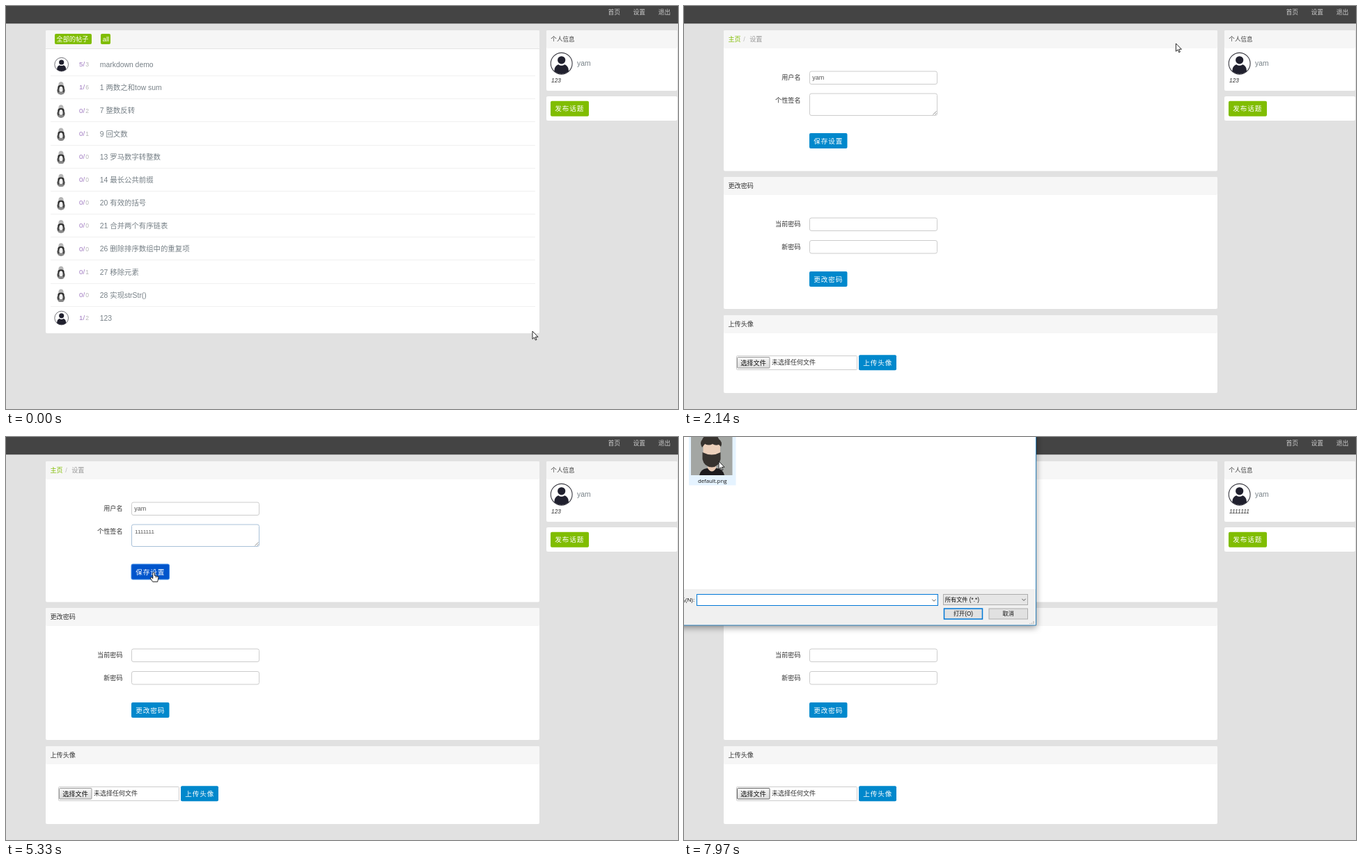
Animation, 965 px wide and 580 px high, one loop 8 s. Source, as an HTML page:

```html
<!DOCTYPE html>
<html lang="zh-CN">
<head>
<meta charset="utf-8">
<title>Settings demo</title>
<style>
html, body { margin: 0; width: 100%; height: 100%; overflow: hidden; background: #e1e1e1; }
svg { display: block; width: 965px; height: 580px; }
text { font-family: "Liberation Sans", "Noto Sans CJK SC", "Noto Sans CJK", sans-serif; white-space: pre; }
.hum { font-family: "Open Sans", "Noto Sans", "Noto Sans CJK SC", sans-serif; }
.btn { letter-spacing: .9px; }
#dialog { filter: drop-shadow(0 3px 5px rgba(0,0,0,.4)); }
#popup rect.card { filter: drop-shadow(0 1px 3px rgba(0,0,0,.3)); }
</style>
</head>
<body>
<svg id="stage" viewBox="0 0 965 580" xmlns="http://www.w3.org/2000/svg"></svg>
<script>
const LOOP = 8000;
const GREEN = '#80bd01', BLUE = '#0088cc', USER = 'yam';

const rect = (x, y, w, h, fill, extra = '') =>
  `<rect x="${x}" y="${y}" width="${w}" height="${h}" fill="${fill}" ${extra}/>`;
const text = (x, y, str, size = 9.1, fill = '#333', extra = '') =>
  `<text x="${x}" y="${y}" font-size="${size}" fill="${fill}" ${extra}>${str}</text>`;
const path = (d, fill, extra = '') => `<path d="${d}" fill="${fill}" ${extra}/>`;
const group = (id, body, extra = '') => `<g id="${id}" ${extra}>${body}</g>`;
const END = 'text-anchor="end"', MID = 'text-anchor="middle"';

const panel = (x, y, w, h) =>
  rect(x, y, w, h, '#fff', 'rx="2"') + rect(x, y, w, 26, '#f6f6f6', 'rx="2"');
const button = (x, y, w, label, fill, id = '') =>
  rect(x, y, w, 22, fill, `rx="2" ${id && `id="${id}"`}`) +
  text(x + 6.2, y + 14.6, label, 9.6, '#fff', 'class="btn"');
const field = (y, h, id = '') =>
  rect(180.5, y, 183, h, '#fff', `rx="2.5" stroke="#ccc" ${id && `id="${id}"`}`);
const chevron = (x, y) =>
  path(`M${x - 2.6} ${y - 1.3}l2.6 2.6 2.6-2.6`, 'none', 'stroke="#444" stroke-width=".9"');

// Round user icon, drawn for radius 15.5
const userIcon = (x, y, k = 1) => `<g transform="translate(${x} ${y}) scale(${k})">
  <circle r="15.4" fill="#fff" stroke="#3a3a42" stroke-width="1.1"/>
  <circle cy="-5" r="5.6" fill="#20202e"/>
  <path d="M-10.3 11.5C-10.3 5.500-8 2.800-4.500 1.500Q0 4.500 4.500 1.500C8 2.800 10.300 5.500 10.300 11.500Q0 18.800-10.300 11.500Z" fill="#20202e"/></g>`;

const catIcon = (x, y) => `<g transform="translate(${x} ${y})">
  <ellipse cy="3.500" rx="5.600" ry="6" fill="#4c4c4c"/>
  <ellipse cy="-4.500" rx="3.600" ry="4.500" fill="#b5b5b5"/>
  <ellipse cy="-1" rx="4.600" ry="3.200" fill="#2f2f2f"/>
  <ellipse cy="2" rx="2.600" ry="4.200" fill="#efefef"/>
  <ellipse cy="7.300" rx="4.300" ry="2" fill="#888"/></g>`;

const topics = [
  ['5/3', 'markdown demo'], ['1/6', '1 两数之和tow sum'], ['0/2', '7 整数反转'],
  ['0/1', '9 回文数'], ['0/0', '13 罗马数字转整数'], ['0/0', '14 最长公共前缀'],
  ['0/0', '20 有效的括号'], ['0/0', '21 合并两个有序链表'], ['0/0', '26 删除排序数组中的重复项'],
  ['0/1', '27 移除元素'], ['0/0', '28 实现strStr()'], ['1/2', '123']
];

function topicRow([count, title], i) {
  const y = 84 + 33.17 * i, last = i === topics.length - 1;
  const [replies, views] = count.split('/');
  return (i === 0 || last ? userIcon(79.7, y + .2, .64) : catIcon(79, y + .9)) +
    text(105, y + 3.3, replies + '/', 9.8, '#9e78c0') +
    text(114.2, y + 3.3, views, 8.6, '#b4b4b4') +
    text(134.8, y + 4, title, 10.4, '#778087') +
    (last ? '' : rect(64, Math.round(y + 16), 696, 1, '#f0f0f0'));
}

const listPage = panel(57, 35, 709, 436) + rect(57, 61, 709, 1, '#e5e5e5') +
  rect(70, 40, 53, 15, GREEN, 'rx="2"') + text(72.5, 51, '全部的帖子', 9.2, '#fff') +
  rect(136, 40, 14, 15, GREEN, 'rx="2"') + text(138.7, 51, 'all', 9.4, '#fff') +
  topics.map(topicRow).join('');

const label = (y, str) => text(167.5, y, str, 9.1, '#333', END);

const settingsPage = panel(57, 35, 709, 202.5) + panel(57, 246, 709, 190) + panel(57, 445, 709, 112) +
  text(63.5, 51.2, '主页', 9.1, GREEN) + text(85.2, 51.2, '/', 9.1, '#bbb') + text(94.2, 51.2, '设置', 9.1, '#999') +
  text(63.5, 262.2, '更改密码') + text(63.5, 461.2, '上传头像') +
  label(106.2, '用户名') + label(138.7, '个性签名') + label(317.4, '当前密码') + label(349.8, '新密码') +
  field(94, 18.5) + field(126, 31.5, 'area') + field(305, 18.5) + field(337.5, 18.5) +
  text(184.3, 106, USER, 9, '#555') + text(185, 138.6, '', 8.1, '#555', 'id="typed"') +
  rect(184.5, 130.500, .8, 10, '#333', 'id="caret"') +
  path('M357.5 156.500l5-5M360.500 156.500l2-2', 'none', 'stroke="#777" stroke-width=".8"') +
  button(180, 183, 54.5, '保存设置', BLUE, 'save') + button(180, 382, 54.5, '更改密码', BLUE) +
  rect(75.5, 503.5, 173, 20, '#fff', 'rx="1" stroke="#ccc"') +
  rect(76.5, 505.5, 46.500, 15.500, 'url(#grey)', 'id="pick" rx="1" stroke="#999"') +
  text(81.2, 516.7, '选择文件', 9.2, '#111') + text(126, 515.6, '未选择任何文件', 9, '#333') +
  button(251, 502.3, 54, '上传头像', BLUE);

const sidebar = panel(776, 35, 188, 87) + rect(776, 130, 188, 35, '#fff', 'rx="2"') +
  text(782.3, 51.2, '个人信息', 8.6, '#444') + userIcon(797.700, 82.800) +
  text(820, 86.3, USER, 10.4, '#778087') +
  text(783, 110.2, '123', 8.4, '#333', 'id="sign" font-style="italic"') +
  button(782, 136.7, 55, '发布话题', GREEN);

const starPoints = Array.from({ length: 10 }, (_, i) => {
  const r = i % 2 ? 2.2 : 5.2, a = Math.PI * (i / 5 - .5);
  return `${283.5 + r * Math.cos(a)},${220.800 + r * Math.sin(a)}`;
}).join(' ');

const popup = rect(222, 202, 162.5, 117.5, '#fff', 'class="card"') + rect(222, 202, 162.5, 1.6, '#cc1a1a') +
  text(230.3, 224.7, '保存设置', 10.4, '#000', 'font-weight="bold"') +
  `<polygon points="${starPoints}" fill="none" stroke="#888" stroke-width=".8"/>` +
  text(376, 223.3, '更多释义»', 8.5, '#999', END) +
  text(230.3, 239.6, 'save settings', 9.3, '#333', 'class="hum"') +
  text(230.3, 263.4, '网络释义', 9.1, '#999') + rect(268, 259.5, 108, 1, '#eee') +
  text(230.3, 277, 'Storage Media ; Se&amp;exit step ; SETS', 8.9, '#333', 'class="hum"') +
  text(230.3, 296.700, '相关查询', 9.1, '#999') + rect(230, 292, 146, 1, '#e6e6e6') +
  text(230.3, 308.2, '设置', 9, '#1a78c2');

const portrait = rect(10, -6, 59.5, 61, '#a3a6a3') +
  path('M22 55Q24 46 33 45H47Q56 46 58 55Z', '#1d1b1d') +
  path('M34 38H46V45Q40 54 34 45Z', '#e6c8b2') +
  path('M27.500 8H52V27Q50 41 40 42Q29 41 27.500 27Z', '#ecd0bb') +
  path('M26.500 22Q40 29 52.500 22V32Q50 43 40 43.500Q29 43 26.500 32Z', '#37332f') +
  path('M26 15Q22 8 26 4Q28-3 37-2Q48-4 50 3Q56 7 53 14L50 11Q45 13 41 10Q36 13 30 10Z', '#37332f');

const dialogButton = (x, w, str, edge, weight) =>
  rect(x, 247, w, 15, '#e1e1e1', `stroke="${edge}" stroke-width="${weight}"`) +
  text(x + w / 2, 257.3, str, 8.2, '#111', MID);

const dialog = rect(-20, -20, 525.5, 291, '#fff') + rect(-20, 219, 525.5, 52, '#f0f0f0') +
  path('M505.500-20V271H-20', 'none', 'stroke="#2c7fb8" stroke-width="1"') +
  rect(7, -5, 67.5, 74.5, '#e5f3ff', 'id="hover"') + portrait +
  text(40.7, 65.5, 'default.png', 7.8, '#111', 'class="hum" ' + MID) +
  text(15.3, 237.2, '文件名(N):', 8.1, '#111', END) +
  rect(18.5, 226.5, 346, 16, '#fff', 'stroke="#0078d7"') + chevron(359, 235) +
  rect(20.700, 229, .9, 11, '#111', 'id="nameCaret"') +
  rect(372.5, 226.5, 121, 15, '#e6e6e6', 'stroke="#adadad"') +
  text(374.800, 237.2, '所有文件 (*.*)', 8.2, '#111') + chevron(488, 234.2) +
  dialogButton(373.5, 55, '打开(O)', '#0078d7', 1.5) + dialogButton(438, 55.5, '取消', '#adadad', 1) +
  path('M502 265v4M499.500 267.500v1.500M497 268v1', 'none', 'stroke="#aaa" stroke-width="1"');

const pointers = group('arrow', path('M0 0V11.300L2.600 8.900 4.300 12.800 6 12.100 4.300 8.300H8Z', '#fff', 'stroke="#111" stroke-width=".9"')) +
  group('hand', path('M-1.300 .900Q0-.700 1.300.900V5L5.800 6Q7 6.500 6.700 8L5.500 13.800H-1.500L-5 8.500Q-4.500 6.700-3 7.500L-1.300 9Z', '#fff', 'stroke="#111" stroke-width=".9"') +
    path('M2.800 5.500V8M4.700 6V8.200', 'none', 'stroke="#111" stroke-width=".6"')) +
  group('beam', path('M-2.500-5H-.700L0-4.500.700-5H2.500M0-4.500V4.500M-2.500 5H-.700L0 4.500.700 5H2.500', 'none', 'stroke="#111" stroke-width="1"'));

document.getElementById('stage').innerHTML =
  `<defs><linearGradient id="grey" x2="0" y2="1"><stop stop-color="#f6f6f6"/><stop offset="1" stop-color="#dcdcdc"/></linearGradient></defs>` +
  rect(0, 0, 965, 580, '#e1e1e1') + rect(0, 0, 965, 25.3, '#444') +
  text(864.500, 12.4, '首页', 8.8, '#ccc') + text(900.500, 12.4, '设置', 8.8, '#ccc', 'id="navSet"') +
  text(936.700, 12.4, '退出', 8.8, '#ccc') +
  group('list', listPage) + group('settings', settingsPage) + sidebar +
  group('popup', popup) + group('dialog', dialog) + group('pointer', pointers);

const el = {};
document.querySelectorAll('[id]').forEach(n => el[n.id] = n);
const show = (id, on) => el[id].setAttribute('display', on ? 'inline' : 'none');
const set = (id, name, value) => el[id].setAttribute(name, value);
const clamp = v => Math.max(0, Math.min(1, v));
const ramp = (t, a, b) => clamp((t - a) / (b - a));
const within = (t, a, b) => t >= a && t < b;
const mix = (a, b, k) => `rgb(${a.map((v, i) => Math.round(v + (b[i] - v) * k))})`;

// Rows of time followed by values, joined by straight runs
function track(keys, t) {
  const i = keys.findIndex(k => k[0] > t);
  if (i < 0) return keys[keys.length - 1].slice(1);
  if (i === 0) return keys[0].slice(1);
  const a = keys[i - 1], b = keys[i], k = ramp(t, a[0], b[0]);
  return a.slice(1).map((v, j) => v + (b[j + 1] - v) * k);
}

const route = [
  [60, 756, 468], [260, 786, 400], [560, 872, 190], [840, 906, 62],
  [1080, 882, 38], [1400, 905, 14], [1520, 908, 9], [1750, 908, 9],
  [1920, 896, 19], [1995, 896, 19], [2300, 500, 92], [2530, 264, 143], [2600, 264, 142],
  [4620, 264, 142], [4940, 213, 195], [5870, 211, 194],
  [6030, 195, 433], [6105, 195, 433], [6420, 109, 511], [6570, 109, 511], [6880, 115, 514],
  [7020, 115, 514], [7110, 128, 507], [7195, 128, 507], [7500, 92, 240], [7810, 56, 23],
  [7890, 54, 29], [7970, 50, 35]
];
const fade = [[6980, 0], [7030, .3], [7110, .66], [7195, .68], [7280, 1]];
const keyTimes = [3840, 4010, 4080, 4250, 4390, 4460, 4600];

function draw(t) {
  const saved = t >= 5480;
  show('list', t < 2070);
  show('settings', t >= 2070);
  set('navSet', 'fill', within(t, 1380, 2070) ? '#fff' : '#ccc');

  const typed = saved ? 0 : keyTimes.filter(k => t >= k).length;
  el.typed.textContent = '1'.repeat(typed);
  el.sign.textContent = saved ? '1111111' : '123';
  set('caret', 'x', 184.5 + typed * 4.5);
  show('caret', within(t, 2760, 3290) || within(t, 3840, 5130));
  const focus = ramp(t, 2760, 2920) - ramp(t, 5230, 5400);
  set('area', 'stroke', mix([204, 204, 204], [118, 178, 233], focus));

  set('save', 'fill', mix([0, 136, 204], [0, 85, 204], saved ? 0 : ramp(t, 4840, 4940)));
  set('save', 'stroke', within(t, 5180, 5480) ? '#3d8ae6' : 'none');
  show('popup', within(t, 5730, 6150));
  set('pick', 'stroke', t >= 6380 ? '#666' : '#999');
  set('pick', 'fill', within(t, 6720, 6860) ? '#d6d6d6' : 'url(#grey)');

  const [alpha] = track(fade, t), scale = 1 - .048 * (1 - alpha);
  show('dialog', alpha > 0);
  set('dialog', 'opacity', alpha);
  set('dialog', 'transform', `translate(201 91) scale(${scale}) translate(-201 -91)`);
  show('hover', t >= 7745);
  show('nameCaret', t < 7890);

  const [x, y] = track(route, t);
  const hand = within(t, 1400, 1850) || within(t, 4860, 5480), beam = within(t, 2600, 4720);
  set('pointer', 'transform', `translate(${x} ${y})`);
  show('hand', hand);
  show('beam', beam);
  show('arrow', !hand && !beam);
}

const start = performance.now();
function tick() {
  draw((performance.now() - start) % LOOP);
  requestAnimationFrame(tick);
}
tick();
</script>
</body>
</html>
```
